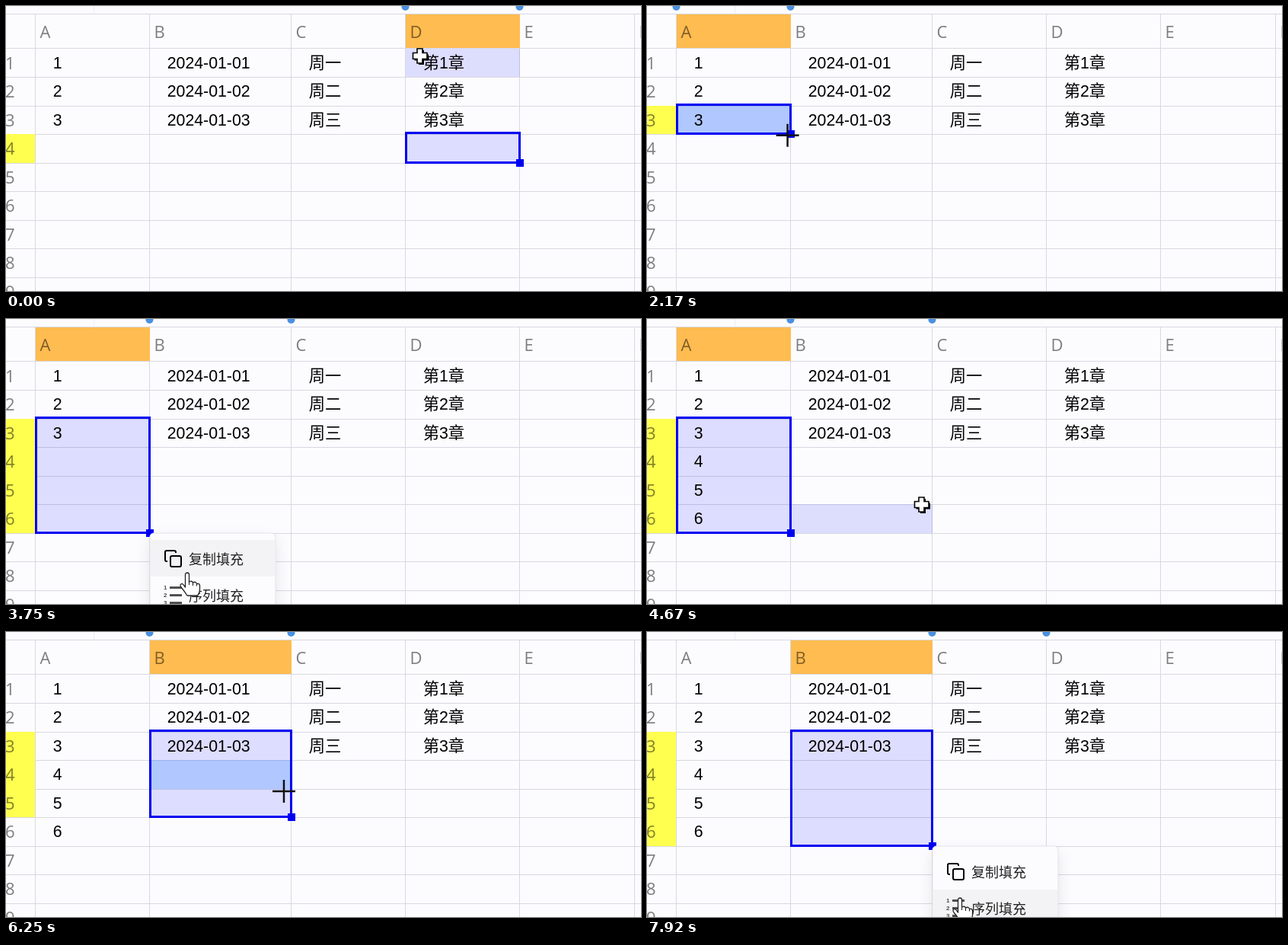
Animation of 834x374 px, one loop 8 s. Source, as an HTML page with a canvas:

```html
<!DOCTYPE html>
<html lang="zh">
<meta charset="utf-8">
<style>
  html, body { margin: 0; height: 100%; overflow: hidden; background: #fcfcff; }
  canvas { display: block; }
</style>
<canvas id="stage" width="834" height="374"></canvas>
<script>
const ctx = document.getElementById('stage').getContext('2d');
const LOOP = 8000, TICK = 1000 / 12;
const colX = [38, 188, 374, 524, 674, 825, 975];
const rowY = row => Math.round(55.5 + 37.5 * (row - 1));
const CELL_FONT = '21.3px "Liberation Sans", "Noto Sans CJK SC", "Noto Sans CJK", sans-serif';
const HEAD_FONT = '22px "Open Sans", "Noto Sans", sans-serif';
const MENU_FONT = '18px "Noto Sans CJK SC", "Noto Sans CJK", sans-serif';
const PAPER = '#fcfcff', LINE = '#d8d8e0', LABEL = 'rgba(0,0,0,.5)', BLUE = '#0000f2';

// Pointer path: tick, x, y
const path = [
  [0, 545, 67], [6, 170, 139], [7, 170, 139], [11, 167, 145], [12, 167, 145],
  [18, 183, 166], [20, 183, 166], [23, 185, 166], [25, 185, 166], [34, 173, 272],
  [36, 173, 272], [45, 238, 333], [46, 238, 345], [49, 239, 350], [51, 239, 350],
  [56, 362, 245], [61, 334, 155], [64, 334, 155], [70, 372, 170], [72, 372, 170],
  [75, 365, 209], [77, 362, 230], [78, 362, 230], [83, 359, 269], [85, 359, 269],
  [95, 411, 349], [96, 411, 349]
];
const within = (k, from, to) => k >= from && k < to;

function pointerAt(k) {
  const i = path.findIndex(p => p[0] > k);
  const [k0, x0, y0] = path[i - 1], [k1, x1, y1] = path[i];
  const p = (k - k0) / (k1 - k0), e = p * p * (3 - 2 * p);
  return { x: x0 + (x1 - x0) * e, y: y0 + (y1 - y0) * e };
}

const colAt = x => colX.findLastIndex(left => x >= left);
const rowAt = y => Math.floor((y - 55.5) / 37.5) + 1;

function selectionAt(k, y) {
  if (k < 13) return { col: 3, top: 4, end: 4 };
  const [col, press, release] = k < 63 ? [0, 27, 34] : [1, 73, 83];
  const end = k < press ? 3 : k < release ? Math.max(3, rowAt(y)) : 6;
  return { col, top: 3, end };
}

function rect(color, x, y, w, h) {
  ctx.fillStyle = color;
  ctx.fillRect(x, y, w, h);
}

function text(str, x, y, font, color) {
  ctx.font = font;
  ctx.fillStyle = color;
  ctx.fillText(str, x, y);
}

function shape(d, fill, stroke, width) {
  const p = new Path2D(d);
  if (fill) { ctx.fillStyle = fill; ctx.fill(p); }
  if (stroke) { ctx.strokeStyle = stroke; ctx.lineWidth = width; ctx.stroke(p); }
}

function fillCells(color, col, top, end) {
  rect(color, colX[col] + 1, rowY(top), colX[col + 1] - colX[col], rowY(end + 1) - rowY(top));
}

function drawGrid(sel) {
  rect(PAPER, 0, 0, 834, 374);
  rect('#eeeef2', 115, 0, 1, 10);
  rect(LINE, 0, 10, 834, 1);
  for (let row = 1; row <= 9; row++) rect(LINE, 0, rowY(row) - (row < 2), 834, 1);
  for (const x of colX) rect(LINE, x, 10, 1, 364);

  const left = colX[sel.col];
  rect('#ffbc50', left + 1, 11, colX[sel.col + 1] - left, 44);
  rect('#ffff50', 0, rowY(sel.top), 38, rowY(sel.end + 1) - rowY(sel.top));
  [...'ABCDEF'].forEach((name, i) => text(name, colX[i] + 6.5, 42, HEAD_FONT, LABEL));
  for (let row = 1; row <= 9; row++) text(row, -1, rowY(row) + 27, HEAD_FONT, LABEL);
}

function drawValues(filled) {
  const put = (str, col, row) => text(str, colX[col] + 23.7, rowY(row) + 25.5, CELL_FONT, '#000');
  for (let row = 1; row <= (filled ? 6 : 3); row++) put(row, 0, row);
  for (let row = 1; row <= 3; row++) {
    put('2024-01-0' + row, 1, row);
    put('周' + '一二三'[row - 1], 2, row);
    put(`第${row}章`, 3, row);
  }
}

function drawSelectionFrame({ col, top, end }) {
  const x = colX[col] + 1.5, right = colX[col + 1] + .5, y = rowY(top) - 1.5, bottom = rowY(end + 1) - .5;
  ctx.strokeStyle = BLUE;
  ctx.lineWidth = 3;
  ctx.strokeRect(x, y, right - x, bottom - y);
  rect(BLUE, right - 4.5, bottom - 4.5, 10, 10);
}

function drawMenu(x, active) {
  const y = 281;
  ctx.save();
  ctx.translate(x, y);
  ctx.shadowColor = 'rgba(0,0,0,.1)';
  ctx.shadowBlur = 20;
  ctx.shadowOffsetY = 8;
  ctx.beginPath();
  ctx.roundRect(0, 0, 165, 116, 5);
  ctx.fillStyle = PAPER;
  ctx.fill();
  ctx.shadowColor = 'transparent';
  ctx.strokeStyle = '#e4e4e8';
  ctx.lineWidth = 1;
  ctx.stroke();
  if (active >= 0) rect('#f3f3f5', 1, 9 + 48 * active, 163, 48);

  shape('M23 37h-1a2 2 0 0 1-2-2v-10a2 2 0 0 1 2-2h10a2 2 0 0 1 2 2v1', null, '#000', 2);
  shape('M29 30h10a2 2 0 0 1 2 2v10a2 2 0 0 1-2 2h-10a2 2 0 0 1-2-2v-10a2 2 0 0 1 2-2z', null, '#000', 2);
  for (let i = 0; i < 3; i++) {
    rect('#505050', 26, 70 + 10 * i, 16, 3);
    text(i + 1, 18, 74 + 10 * i, 'bold 8px "Liberation Sans", sans-serif', '#505050');
  }
  text('复制填充', 51, 41, MENU_FONT, '#222');
  text('序列填充', 51, 89, MENU_FONT, '#222');
  ctx.restore();
}

function drawPointer(kind, x, y) {
  ctx.save();
  ctx.translate(x, y);
  ctx.lineJoin = 'round';
  if (kind === 'hand') {
    shape('M-2.5 19V2.5a2.5 2.5 0 0 1 5 0V12q4-2 5 1 4-2 5 1.5 4-1 4 2.5v5q0 4-3 8H0q-3-5-8-11-2-3 0-4.2t4 2.2Z', '#fff', '#222', 1.3);
    shape('M2.5 11v5M7.5 13v4M12.5 14.5v3', null, '#222', 1.1);
  } else if (kind === 'cross') {
    shape('M-15 0H15M0-15V15', null, '#111', 2.5);
  } else {
    const plus = 'M-4-9.5H3V-4H9V4H3V9.5H-4V4H-9.5V-4H-4Z';
    ctx.lineJoin = 'miter';
    ctx.translate(1, .5);
    shape(plus, '#000');
    ctx.translate(-2, -2);
    shape(plus, '#fff', '#000', 1.6);
  }
  ctx.restore();
}

function drawDots(col) {
  ctx.fillStyle = '#4a90e2';
  for (const x of [colX[col], colX[col + 1]]) {
    ctx.beginPath();
    ctx.arc(x + .5, 1, 5, 0, 7);
    ctx.fill();
  }
}

function draw(k) {
  const { x, y } = pointerAt(k);
  const sel = selectionAt(k, y);
  const menuX = within(k, 38, 52) ? 189 : k >= 87 ? 375 : 0;
  const overMenu = menuX && x >= menuX && y >= 281;
  const dragging = within(k, 26, 37) || within(k, 73, 86);
  const hover = dragging ? (k < 63 ? { col: 0, row: 3 } : { col: 1, row: 4 })
                         : { col: colAt(x), row: rowAt(y) };

  drawGrid(sel);
  fillCells('rgba(0,0,255,.12)', sel.col, sel.top, sel.end);
  if (!overMenu) {
    const selected = hover.col === sel.col && hover.row >= sel.top && hover.row <= sel.end;
    fillCells(selected ? 'rgba(70,150,255,.3)' : 'rgba(0,0,240,.12)', hover.col, hover.row, hover.row);
  }
  drawValues(k >= 52);
  drawSelectionFrame(sel);
  drawDots(hover.col);
  if (menuX) drawMenu(menuX, overMenu ? (y < 338 ? 0 : 1) : -1);

  const onHandle = within(k, 17, 34) || within(k, 69, 83);
  drawPointer(overMenu ? 'hand' : onHandle ? 'cross' : 'plus', x, y);
}

function frame() {
  const t = performance.now() % LOOP;
  draw(Math.min(95, Math.floor((t + 4) / TICK)));
  requestAnimationFrame(frame);
}
frame();
</script>
</html>
```
